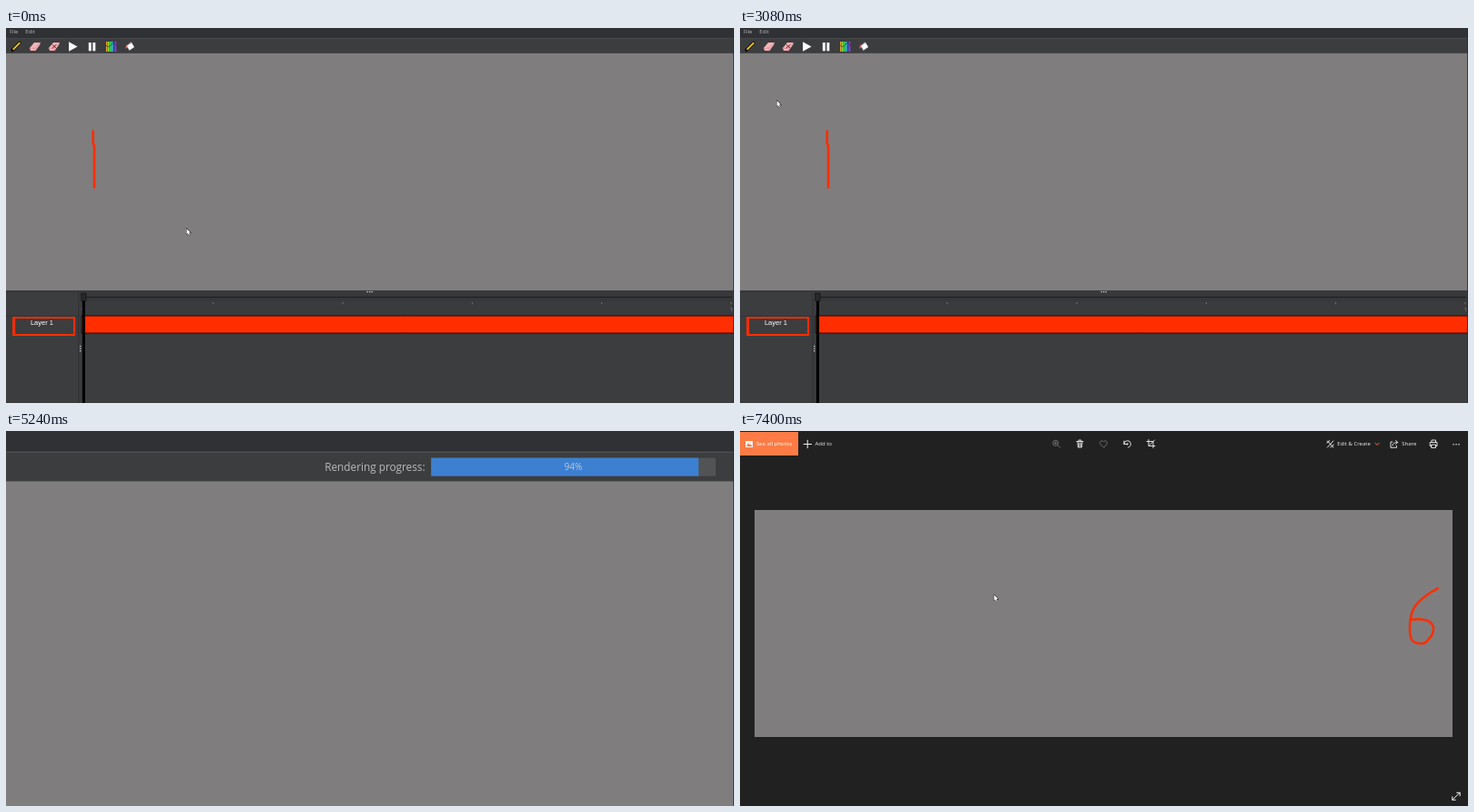
Write an HTML page with a canvas that moves like this. It is 800x413 px and loops after 7.44 s.

```html
<!DOCTYPE html>
<html lang="en">
<head>
<meta charset="utf-8">
<title>Drawing app: play and render</title>
<style>
html, body { margin: 0; width: 100%; height: 100%; overflow: hidden; background: #212121; }
canvas { display: block; }
</style>
</head>
<body>
<canvas id="stage" width="800" height="413"></canvas>
<script>
const ctx = document.getElementById('stage').getContext('2d');
const LOOP = 7440, STEP = 200;
const RED = '#ff2e00', GREY = '#807d7f', PANEL = '#3c3d3f', TEXT = '#b9bbbd';

// Hand-drawn digits, in drawing-area coordinates.
const digits = [
  'M95.7 113.5V127Q97 129 97 131V175.5',
  'M215 139C219 118 250 119 247 140C244 156 226 170 216 180H256',
  'M352.5 141H376C387 142 384 149 381 155C378 161 371 164 358.5 165Q370 163 376 165C378 171 381 179 381 187C378 191 368 193 358 196.5',
  'M500 130L484 170H523M508 148V206',
  'M654 124H626L623 152C646 145 657 158 653 176C649 192 634 198 621 198',
  'M783 118C772 123 757 135 754 144C750 154 750 172 753 177C756 182 767 182 769 180C776 173 778 170 778 163C776 154 766 152 751 154'
];

// Pointer path: time, x, y.
const pointerPath = [
  [0, 198.5, 221], [1000, 240, 265], [1560, 294, 310], [2000, 294, 310],
  [2600, 9, 4], [2800, 9, 4], [3000, 40.5, 80], [3320, 40.5, 80], [3960, 455, 279.5]
];

const clamp = v => Math.max(0, Math.min(1, v));
const smooth = v => { v = clamp(v); return v * v * (3 - 2 * v); };

function rect(x, y, w, h, fill, border) {
  ctx.fillStyle = fill;
  ctx.fillRect(x, y, w, h);
  if (border) {
    ctx.strokeStyle = border;
    ctx.lineWidth = .8;
    ctx.strokeRect(x, y, w, h);
  }
}

function line(d, color, width = 1) {
  ctx.strokeStyle = color;
  ctx.lineWidth = width;
  ctx.stroke(new Path2D(d));
}

function shape(d, color) {
  ctx.fillStyle = color;
  ctx.fill(new Path2D(d));
}

function text(s, x, y, color = TEXT, size = 5.9, align = 'left', family = '"Open Sans", sans-serif') {
  ctx.font = `${size}px ${family}`;
  ctx.textAlign = align;
  ctx.fillStyle = color;
  ctx.fillText(s, x, y);
}

function dots(x, y, dx, dy, color) {
  for (let i = -1; i < 2; i++) rect(x + i * dx - .6, y + i * dy - .6, 1.3, 1.3, color);
}

function drawDigit(i) {
  line(digits[i], RED, 2.7);
}

function drawPointer(x, y) {
  ctx.save();
  ctx.translate(x, y);
  const arrow = 'M0 0V6.2L1.4 5L2.4 7.2L3.5 6.7L2.5 4.6H4.4Z';
  line(arrow, '#222', 1);
  shape(arrow, '#fff');
  ctx.restore();
}

function pointerAt(t) {
  const i = pointerPath.findIndex(p => p[0] > t);
  if (i < 0) return pointerPath.at(-1).slice(1);
  const [t0, x0, y0] = pointerPath[i - 1], [t1, x1, y1] = pointerPath[i];
  const k = smooth((t - t0) / (t1 - t0));
  return [x0 + (x1 - x0) * k, y0 + (y1 - y0) * k];
}

function drawToolbar() {
  rect(0, 0, 800, 12, '#2f3134');
  rect(0, 11.3, 800, .7, '#505153');
  rect(0, 12, 800, 15.7, PANEL);
  text('File', 4, 6.2);
  text('Edit', 21.3, 6.2);
  line('M7 24.5L15 16.3', '#111', 3.6);
  line('M8.3 23.2L14.8 16.6', '#f5c518', 1.9);
  for (const x of [26, 47]) {
    shape(`M${x} 22L${x + 5} 16H${x + 11.5}V18L${x + 6.5} 25H${x + 1}Z`, '#f4b4b8');
    line(`M${x} 22.3H${x + 6}L${x + 11.5} 16M${x + 6} 22.3V25`, '#d98a92', .7);
  }
  line('M51 18.5L55 22M55 18.5L51 22', '#7b2b32', 1);
  shape('M69 15.3L78.5 20.5L69 25.8Z', '#fff');
  rect(90.8, 16, 2.9, 9.3, '#fff');
  rect(95.4, 16, 2.9, 9.3, '#fff');
  for (let i = 0; i < 6; i++) rect(110 + i * 1.95, 15, 1.5, 11, `hsl(${40 + i * 48} 75% 55%)`);
  line('M110 19Q113 23 116 18T121.5 20', '#333', .7);
  shape('M131 23L132 19L135.5 17.5L134 21Z', '#d86a66');
  shape('M133 20L138 16L141 21L135.5 24.8Z', '#fff');
  line('M134 19L137 15.7', '#ddd', .7);
}

function drawTimeline(index) {
  const x = 85.5 + index * 142.3;
  rect(0, 289, 800, 124, PANEL);
  rect(0, 289, 800, 3, '#38393b');
  dots(399.7, 290.5, 2.5, 0, '#ddd');
  rect(84, 292.5, 714, 8.5, '#37383a');
  rect(84, 296, 714, 1, '#1d1d1e');
  rect(84, 301, 715, 15, '#3a3b3d');
  rect(79.5, 292, .8, 121, '#2c2d2f');
  rect(83.3, 292, .8, 121, '#2c2d2f');
  rect(0, 317, 80, .7, '#313234');
  dots(81.6, 353, 0, 2.6, '#ccc');
  for (let i = 0; i < 6; i++) rect(85 + i * 142.3, 302, .9, 2.2, '#77787a');
  text('0', 83.5, 312.3, '#999', 5.9);
  text('1', 795.5, 312.3, '#999', 5.9);
  rect(83.5, 317, 717, 19, RED, '#000');
  line('M8.5 319H75V338H8.5Z', RED, 1.9);
  rect(7.3, 318, 2.8, 21, RED);
  text('Layer 1', 39.4, 327.2, '#fff', 7.5, 'center', '"Liberation Sans", sans-serif');
  rect(x - 2.5, 292, 5, 8.5, '#27282a', '#161616');
  rect(x - 1.5, 301, 3, 112, '#000');
}

function drawDialog(t) {
  rect(269.5, 105, 260, 185, PANEL, '#777');
  rect(269.5, 105, 260, 16, '#fff');
  rect(274.5, 109.5, 7, 7, '#555');
  text('Render gif', 284, 115.3, '#222', 6);
  line('M518.3 110.5L523.3 115.5M523.3 110.5L518.3 115.5', '#222', .8);

  text('Save In:', 276, 135.2);
  rect(302.5, 126.5, 147.5, 13, '#3e4143', '#66686a');
  shape('M306.5 129.5H309L310 130.5H313V136.5H306.5Z', '#e9bd52');
  text('KeyFrames Creations', 316, 135.2);
  line('M442 131.8L444.3 134.3L446.6 131.8', '#aaa', .8);
  shape('M460 130H463L464 131H466.5V136H460Z', '#9aa7b0');
  line('M464.5 135V130', '#3592c4', 1.2);
  shape('M473 133L476.7 129.5L480.4 133H479.3V136.3H474.2V133Z', '#afb1b3');
  shape('M487 130H490L491 131H493.5V136H487Z', '#afb1b3');
  line('M492 134V138M490 136H494', '#afb1b3', .9);
  for (const dx of [0, 3.2]) for (const dy of [0, 3.2]) rect(501 + dx, 130 + dy, 2.2, 2.2, '#afb1b3');
  rect(512, 127.5, 10.5, 11, '#55595c', '#666');
  for (let y = 130.5; y < 137; y += 2.3) {
    rect(514, y, 1, 1, '#bbb');
    rect(516, y, 4.5, 1, '#bbb');
  }

  rect(276, 145.5, 248, 87.5, '#434749', '#606264');
  rect(276.4, 146, 247.2, 12, PANEL);
  rect(276, 158, 248, .7, '#5b5d5f');
  for (const x of [338, 370, 416, 472.5]) rect(x, 146, .7, 12, '#5b5d5f');
  text('Name', 278, 154);
  text('Size', 368.5, 154, TEXT, 5.9, 'right');
  text('Type', 372, 154);
  text('Modified', 418.5, 154);

  const typed = 'testgif'.slice(0, Math.floor(clamp((t - 3520) / 420) * 7));
  text('File Name:', 276, 246.4);
  rect(318, 239, 206, 11, '#45494a', '#4a88c7');
  text(typed, 321, 246.4);
  rect(321.3 + ctx.measureText(typed).width, 241, .7, 7, '#ccc');
  text('Files of Type:', 276, 260.5);
  rect(318, 253, 206, 11, '#3e4143', '#66686a');
  text('GIF Image', 321, 260.5);
  line('M516 257.5L518.3 260L520.6 257.5', '#aaa', .8);

  rect(447, 273.5, 37, 11, '#365880', '#4c708c');
  text('Save', 465.5, 281, '#e4e8ee', 5.9, 'center');
  rect(487, 273.5, 37, 11, '#4c5052', '#5e6060');
  text('Cancel', 505.5, 281, TEXT, 5.9, 'center');
}

function drawProgress(t) {
  const percent = Math.floor(100 * clamp((t - 4560) / 720));
  text(percent < 100 ? 'Rendering progress:' : 'Rendering finished!', 630.3, 22, TEXT, 5.9, 'right');
  rect(633.6, 14.8, 156.3, 10, '#525355');
  rect(633.6, 14.8, 156.3 * percent / 100, 10, '#3d80d2');
  text(percent + '%', 711.7, 21.6, '#c3c7cb', 5, 'center');
}

function drawEditor(t) {
  const zoom = 1 + smooth((t - 4160) / 320) - smooth((t - 5680) / 320);
  const index = t < 2280 ? Math.floor((t + 120) / STEP) % 6 : 0;
  ctx.save();
  ctx.translate(800, 0);
  ctx.scale(zoom, zoom);
  ctx.translate(-800, 0);
  rect(0, 27.5, 800, 262, GREY);
  drawDigit(index);
  drawToolbar();
  drawTimeline(index);
  if (t >= 3320 && t < 4140) drawDialog(t);
  if (t >= 4140) drawProgress(t);
  drawPointer(...pointerAt(t));
  ctx.restore();
  rect(799.2, 0, .8, 413, '#2b2c2e');
}

function drawViewer(t) {
  const white = '#f2f2f2', dim = '#777';
  rect(0, 0, 800, 413, '#212121');
  rect(0, 1, 64, 26, '#ff7b45');
  rect(6, 11, 8, 7, white);
  shape('M7 17L9.3 13.5L11 15.5L12 14.5L13.2 17Z', '#ff7b45');
  text('See all photos', 18, 16.4, '#fff', 6);
  line('M70 14.5H78.5M74.2 10.2V18.7', white, 1);
  text('Add to', 82.5, 16.4, white, 6);

  line('M349.8 13.3A3 3 0 1 1 343.8 13.3A3 3 0 1 1 349.8 13.3M349 15.5L351.8 18.3M345.3 13.3H348.3M346.8 11.8V14.8', dim, .9);
  line('M370 11.5H377M372.2 11V10H374.8V11M371 12L371.5 18H375.5L376 12M372.7 13V17M374.3 13V17', white, .9);
  line('M399.5 18L395.8 14.2C394.5 11.5 398 9.5 399.5 12C401 9.5 404.5 11.5 403.2 14.2Z', dim, .9);
  line('M422 14.5A3.7 3.7 0 1 1 426.5 18M422 11V14.5H425', white, .9);
  rect(424.7, 13.5, 1.8, 1.8, white);
  line('M449 9.5V16.5H456M447 11.5H454V18.5M450 15.5L455.5 10', white, .9);

  line('M645.5 11L652 18M652 11L645.5 18M645 13L648 10.5M649 18L652.5 15', white, 1);
  text('Edit & Create', 656.3, 16.4, white, 6);
  line('M698 13.2L700.2 15.5L702.4 13.2', '#ff7b45', .9);
  line('M717 12H715V18.3H721.5V16.5M717 16C717.3 13.5 719 12.5 722.5 12.5M720.5 10.2L722.8 12.5L720.5 14.8', white, .9);
  text('Share', 727.3, 16.4, white, 6);
  line('M760 12.5V10H764.5V12.5M760 16.5H758.2V12.5H766V16.5H764.5M760 15H764.5V18.5H760Z', white, .9);
  dots(787, 14.7, 3, 0, white);
  line('M783 406L791 398.5M787.7 398.3H791.2V401.8M782.8 402.8V406.3H786.3', white, 1);

  rect(16, 87, 767, 250, GREY);
  ctx.save();
  ctx.translate(16, 87);
  ctx.scale(.959, .959);
  ctx.translate(0, -28);
  drawDigit(Math.min(5, Math.floor((t - 6240) / STEP)));
  ctx.restore();
  drawPointer(279.3, 180.5);
}

ctx.lineCap = ctx.lineJoin = 'round';
const start = performance.now();

function frame() {
  const t = (performance.now() - start) % LOOP;
  if (t < 6240) drawEditor(t);
  else drawViewer(t);
  requestAnimationFrame(frame);
}
frame();
</script>
</body>
</html>
```
